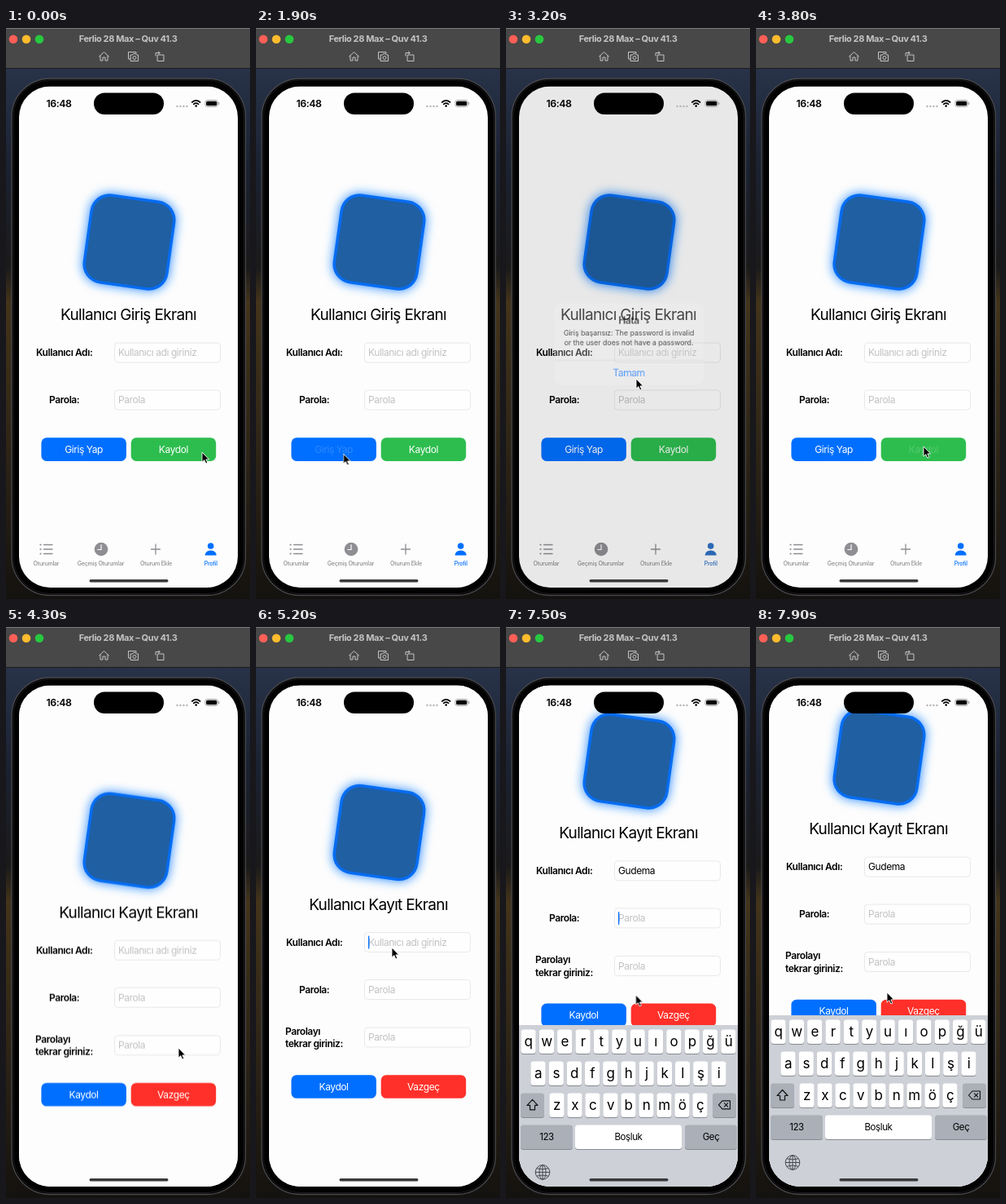
An HTML page that plays this animation: 300 by 700 pixels, repeating every 8000 ms.

```html
<!DOCTYPE html>
<html lang="tr">
<head>
<meta charset="utf-8">
<title>Kullanıcı Girişi</title>
<style>
  html, body { margin: 0; width: 100%; height: 100%; overflow: hidden; background: #000; }
  svg { display: block; width: 300px; height: 700px; }
  text { font-family: Inter, Roboto, sans-serif; letter-spacing: -.035em; white-space: pre; }
  #alert { transform-box: fill-box; transform-origin: center; }
  .line { fill: none; stroke-linecap: round; stroke-linejoin: round; }
</style>
</head>
<body>
<script>
const LOOP = 8000;
const BLUE = '#006fff', GREEN = '#2dbd4e', RED = '#ff3029', GREY = '#8e8e93', HINT = '#c2c2c5';
const CHROME = '#c4c4c4';
const NAME = 'Gudema', KEYED = [5700, 6000, 6100, 6200, 6300, 6400];

// --- drawing helpers -------------------------------------------------
const text = (x, y, s, size = 12, attrs = '') =>
  `<text x="${x}" y="${y + size * .36}" font-size="${size}" ${attrs}>${s}</text>`;
const mid = (x, y, s, size, attrs = '') => text(x, y, s, size, `text-anchor="middle" ${attrs}`);
const rect = (x, y, w, h, r, fill, attrs = '') =>
  `<rect x="${x}" y="${y}" width="${w}" height="${h}" rx="${r}" fill="${fill}" ${attrs}/>`;
const screenRect = (r, fill, attrs) => rect(16, 71.5, 269, 614.5, r, fill, attrs);
const dot = (x, y, r, fill, attrs = '') => `<circle cx="${x}" cy="${y}" r="${r}" fill="${fill}" ${attrs}/>`;
const line = (d, stroke, w = 1, attrs = '') =>
  `<path class="line" d="${d}" stroke="${stroke}" stroke-width="${w}" ${attrs}/>`;
const label = (x, y, s) => text(x, y, s, 12, 'font-weight="600"');
const field = (y, hint, id = '') =>
  rect(133.5, y - 12, 130, 24, 4, '#fefefe', 'stroke="#e8e8ea"') +
  text(138, y, hint, 12, `fill="${HINT}" ${id && `id="${id}"`}`);
const button = (x, y, s, fill, id = '') =>
  rect(x, y - 14.3, 104.5, 28.6, 6.5, fill) +
  mid(x + 52.2, y, s, 12, `fill="#fff" ${id && `id="${id}"`}`);

const badge = cy => `<g transform="translate(151.5 ${cy}) rotate(8)">
  ${rect(-53, -55.5, 106, 111, 24, '#1a84ff', 'filter="url(#glow)"')}
  ${rect(-53, -55.5, 106, 111, 24, '#066cf2')}
  ${rect(-49.5, -52, 99, 104, 20.5, '#1f5fa2')}</g>`;

// --- parts -----------------------------------------------------------
const desktop = `${rect(0, 0, 300, 700, 0, 'url(#wall)')}
  ${rect(0, 0, 300, 50, 0, '#484848')}${rect(0, 0, 300, 1, 0, '#7c7c7c')}${rect(0, 49, 300, 1, 0, '#1c1c1c')}
  ${dot(9, 13.7, 5.3, '#ff5f57')}${dot(25, 13.7, 5.3, '#febc2e')}${dot(41, 13.7, 5.3, '#28c840')}
  ${mid(150, 13.5, 'Ferlio 28 Max – Quv 41.3', 11, `font-weight="700" fill="${CHROME}"`)}
  ${line('M114.5 35 L120.5 29.5 L126.5 35 M116 34 V40 H119 V36 H122 V40 H125 V34', CHROME)}
  ${line('M153 38 H150.5 V29.5 H160 V31 M153.5 33 H155.5 L156.5 31.5 H159.5 L160.5 33 H162.5 V40.5 H153.5Z', CHROME)}
  ${dot(158, 36.5, 2, 'none', `stroke="${CHROME}"`)}
  ${line('M186.5 33 H194 V40.5 H186.5Z M184 34 V30.5 H189 M187.5 29 L189.2 30.5 L187.5 32', CHROME)}`;

const phone = rect(7, 62, 287.5, 633.5, 47, '#020203', 'stroke="#48484c" stroke-width="1.3"') +
  rect(9, 64, 283.5, 629.5, 45, 'none', 'stroke="#1a1a1c"');

const tabs = `
  <g fill="${GREY}">
    ${[633.5, 639, 644.5].map(y => dot(42.5, y, 1.1, GREY) + line(`M46.5 ${y} H57`, GREY, 1.3)).join('')}
    ${dot(117, 639, 8.3, GREY)}${line('M117 633.5 V639.5 H112.8', '#fff', 1.2)}
    ${line('M178.5 639 H189.5 M184 633 V645', GREY, 1.3)}
    ${mid(49.5, 656, 'Oturumlar', 7.1, 'font-weight="500"')}
    ${mid(116.5, 656, 'Geçmiş Oturumlar', 7.1, 'font-weight="500"')}
    ${mid(184.5, 656, 'Oturum Ekle', 7.1, 'font-weight="500"')}
  </g>
  <g id="tint" fill="${BLUE}">
    <circle cx="251.7" cy="635" r="3.8"/>
    <path d="M244.7 646.5 C244.7 638.5 258.7 638.5 258.7 646.5Z"/>
    ${mid(251.8, 656, 'Profil', 7.1, 'font-weight="500"')}
  </g>`;

const login = `${screenRect(0, '#fdfdfd')}
  ${badge(262.5)}
  ${mid(150.5, 351.5, 'Kullanıcı Giriş Ekranı', 19)}
  ${label(37, 398, 'Kullanıcı Adı:')}${field(398, 'Kullanıcı adı giriniz')}
  ${label(53, 456, 'Parola:')}${field(456, 'Parola')}
  ${button(43.4, 516.6, 'Giriş Yap', BLUE, 'signIn')}
  ${button(153.7, 516.6, 'Kaydol', GREEN, 'signUp')}${tabs}`;

const alertBox = `${screenRect(0, '#000', 'id="dim" opacity="0"')}
  <g id="alert">
    ${rect(59, 337.5, 184, 101, 10, '#f1f1f2', 'id="panel" opacity="0"')}
    <g id="alertText" opacity="0">
      ${mid(151, 358, 'Hata', 12, 'font-weight="600"')}
      ${mid(151, 374, 'Giriş başarısız: The password is invalid', 9, 'style="letter-spacing:-.012em"')}
      ${mid(151, 386, 'or the user does not have a password.', 9, 'style="letter-spacing:-.012em"')}
      ${line('M59.5 407.5 H242.5', '#d2d2d5', .6)}
      ${mid(151, 422.5, 'Tamam', 12, `fill="${BLUE}"`)}
    </g>
  </g>`;

const register = `<g id="modal">${rect(16, 71.5, 269, 720, 0, '#fdfdfd')}<g id="form">
  ${badge(252)}
  ${mid(150.5, 340, 'Kullanıcı Kayıt Ekranı', 19)}
  ${label(37, 386.5, 'Kullanıcı Adı:')}${field(386.5, 'Kullanıcı adı giriniz', 'hint')}
  ${text(138, 386.5, '', 12, 'id="typed"')}
  ${label(53, 444.5, 'Parola:')}${field(444.5, 'Parola')}
  ${label(36, 495.5, 'Parolayı')}${label(36, 511, 'tekrar giriniz:')}${field(503, 'Parola')}
  ${button(43.4, 563.5, 'Kaydol', BLUE)}${button(153.7, 563.5, 'Vazgeç', RED)}
  ${rect(0, -8, 1.3, 16, .6, BLUE, 'id="caret"')}
</g></g>`;

const key = (x, y, w, s, fill = '#fff', size = 17) =>
  rect(x - w / 2, y - 13.5, w, 29.5, 3.5, '#888b91') +
  rect(x - w / 2, y - 14.5, w, 29.5, 3.5, fill) + mid(x, y - .5, s, size);
const row = (keys, x, y, pitch) =>
  [...keys].map((k, i) => key(x + i * pitch, y, 18.3, k)).join('');
const keyboard = `<g id="keys">${rect(16, 476, 269, 230, 0, '#cdd0d6')}
  ${row('qwertyuıopğü', 27.5, 496, 22.36)}
  ${row('asdfghjklşi', 39.5, 535, 22.2)}
  ${row('zxcvbnmöç', 62.5, 574, 22)}
  ${key(32.5, 574, 29, '', '#aaafb8')}${key(268.5, 574, 29, '', '#aaafb8')}
  ${line('M32.5 567.5 L39 574.5 H35.5 V580 H29.5 V574.5 H26Z', '#111', 1.2)}
  ${line('M261.5 574 L266 569 H275.5 V579 H266Z M268.5 571.8 L272.8 576.2 M272.8 571.8 L268.5 576.2', '#111', 1.1)}
  ${key(50, 613, 64, '123', '#aaafb8', 11.5)}
  ${key(150.5, 613, 131, 'Boşluk', '#fff', 11.5)}
  ${key(252, 613, 64, 'Geç', '#aaafb8', 11.5)}
  <g fill="none" stroke="#45474c"><circle cx="45" cy="656.5" r="8.8"/>
    <ellipse cx="45" cy="656.5" rx="4" ry="8.8"/>
    <path d="M36.2 656.5 H53.8 M45 647.7 V665.3 M37.8 651.8 Q45 654 52.2 651.8 M37.8 661.2 Q45 659 52.2 661.2"/></g>
</g>`;

const status = `${rect(108, 79.5, 86, 26.5, 13.2, '#000')}
  ${mid(65, 92.5, '16:48', 12.4, 'font-weight="600"')}
  ${[210.5, 214.5, 218.5, 222.5].map(x => dot(x, 96, 1.2, '#b4b4b6')).join('')}
  ${line('M228.8 91 Q233.7 86.6 238.6 91 M230.8 93.4 Q233.7 91 236.6 93.4', '#000', 1.7)}
  ${dot(233.7, 95.6, 1.3, '#000')}
  ${rect(244.9, 88.5, 15.6, 8, 2.6, 'none', 'stroke="#999" stroke-width=".8"')}
  ${rect(246.1, 89.7, 13.2, 5.6, 1.6, '#000')}${rect(261.4, 91, 1, 3, .5, '#999')}
  ${rect(102.5, 676, 97, 3.4, 1.7, '#3a3a3c')}`;

const pointer = `<path id="pointer" d="M0 0 V12.2 L2.8 9.6 L4.8 14 L6.8 13.1 L4.9 8.9 H8.6Z"
  fill="#000" stroke="#fff" stroke-width=".9" stroke-linejoin="round"/>`;

document.body.innerHTML = `<svg viewBox="0 0 300 700">
  <defs>
    <linearGradient id="wall" x2="0" y2="1">
      <stop offset=".07" stop-color="#283349"/><stop offset=".25" stop-color="#1a2130"/>
      <stop offset=".42" stop-color="#1b1a1a"/><stop offset=".48" stop-color="#43341a"/>
      <stop offset=".7" stop-color="#312717"/><stop offset="1" stop-color="#14120f"/>
    </linearGradient>
    <filter id="glow" x="-30%" y="-30%" width="160%" height="160%">
      <feGaussianBlur stdDeviation="6.5"/>
    </filter>
    <clipPath id="screen">${screenRect(38, '#000')}</clipPath>
  </defs>
  ${desktop}${phone}
  <g clip-path="url(#screen)">${login}${alertBox}${register}${keyboard}${status}</g>
  ${pointer}
</svg>`;

// --- motion ----------------------------------------------------------
const $ = id => document.getElementById(id);
const at = (x, y) => ({ transform: `translate(${x}px, ${y}px)` });
const fade = opacity => ({ opacity });

// steps: [ms, properties, easing towards the next step]
function play(id, steps) {
  const all = [[0, steps[0][1]], ...steps, [LOOP, steps[steps.length - 1][1]]];
  return $(id).animate(
    all.map(([ms, props, easing = 'linear']) => ({ offset: ms / LOOP, easing, ...props })),
    { duration: LOOP, iterations: Infinity });
}

const GLIDE = 'ease-in-out', SHEET = 'cubic-bezier(.32,.72,0,1)', RISE = 'cubic-bezier(.2,.8,.2,1)';
const HOLD = 'steps(1, end)';

const clock = play('pointer', [
  [1000, at(241, 520), GLIDE], [1650, at(107.5, 522)],
  [2350, at(107.5, 522), GLIDE], [2900, at(160, 430)],
  [3300, at(160, 430), GLIDE], [3750, at(206, 513)],
  [3900, at(206, 513), GLIDE], [4300, at(212, 516)],
  [4600, at(212, 516), GLIDE], [5050, at(167, 393)],
  [6650, at(167, 393), GLIDE], [7050, at(159, 452)],
  [7400, at(159, 452), GLIDE], [7700, at(161, 448)],
]);

const press = (id, from, to) =>
  play(id, [[from - 1, fade(1), HOLD], [from, fade(.17), HOLD], [to, fade(1)]]);
press('signIn', 1850, 2050);
press('signUp', 3750, 3900);

const popup = (id, shown, hidden, half) => play(id, [
  [2300, hidden], [2500, shown], [3090, shown], [3200, half], [3310, hidden]]);
popup('dim', fade(.2), fade(0), fade(.085));
popup('panel', fade(.96), fade(0), fade(.3));
popup('alertText', fade(1), fade(0), fade(.65));
popup('tint', { fill: GREY }, { fill: BLUE }, { fill: '#2f70c4' });
play('alert', [[2300, { transform: 'scale(1.18)' }, RISE], [2600, { transform: 'scale(1)' }]]);

play('modal', [[3870, at(0, 620), SHEET], [4520, at(0, 0)]]);
play('form', [[7280, at(0, 0), RISE], [7720, at(0, -92.5)]]);
play('keys', [[7280, at(0, 224), RISE], [7720, at(0, 0)]]);

function tick() {
  const t = (clock.currentTime || 0) % LOOP;
  const typed = $('typed'), caret = $('caret');
  const value = NAME.slice(0, KEYED.filter(k => k <= t).length);
  if (typed.textContent !== value) typed.textContent = value;
  $('hint').style.visibility = value ? 'hidden' : 'visible';

  const inName = t >= 5050 && t < 7080;
  const inPass = t >= 7080 && (t - 7080) % 1000 < 500;
  const x = 138 + (inName && value ? typed.getComputedTextLength() : 0);
  caret.setAttribute('transform', `translate(${x} ${inName ? 386.5 : 444.5})`);
  caret.style.visibility = inName || inPass ? 'visible' : 'hidden';
  requestAnimationFrame(tick);
}
tick();
</script>
</body>
</html>
```
